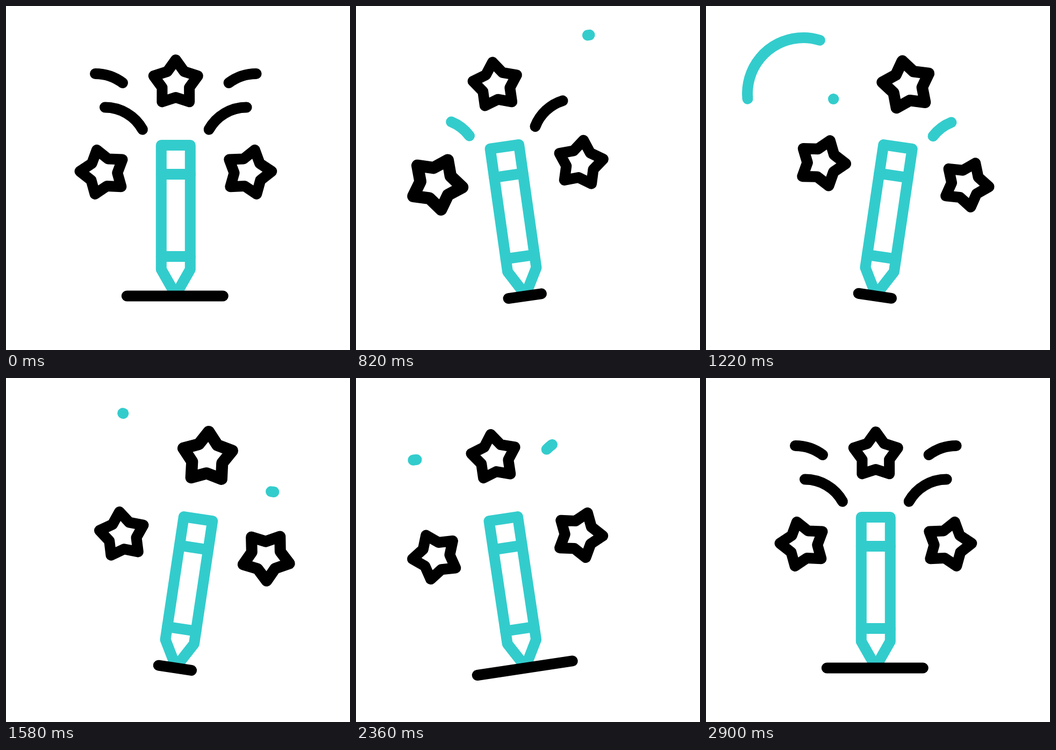
Write an HTML page with a canvas that moves like this. It is 640x640 px and loops after 3220 ms.

```html
<!DOCTYPE html>
<html lang="en">
<head>
<meta charset="utf-8">
<title>Magic pencil</title>
<style>
  html, body { margin: 0; height: 100%; overflow: hidden; background: #fff; }
  canvas { display: block; width: 100vmin; height: 100vmin; }
</style>
</head>
<body>
<canvas width="640" height="640"></canvas>
<script>
const ctx = document.querySelector('canvas').getContext('2d');
const LOOP = 3220, BLACK = '#000', TEAL = '#33cccc', RAD = Math.PI / 180;
const PIVOT = [315.8, 540];

const linear = u => u;
const sine = u => (1 - Math.cos(Math.PI * u)) / 2;
const lerp = (a, b, u) => a + (b - a) * u;

// Value at time t of a list of [time, value] keys, held at both ends.
function track(t, keys, ease = sine) {
  if (t <= keys[0][0]) return keys[0][1];
  for (let i = 1; i < keys.length; i++) {
    const [t0, v0] = keys[i - 1], [t1, v1] = keys[i];
    if (t < t1) return lerp(v0, v1, ease((t - t0) / (t1 - t0)));
  }
  return keys[keys.length - 1][1];
}
const ramp = (t, start, end) => track(t, [[start, 0], [end, 1]]);

const SWING = [[240, 0], [691, -10], [1338, 10], [1455, 10], [2180, -10], [2900, 0]];
const BAR = [[240, 89.5], [540, 31], [1900, 31], [2320, 89.5]];
const SPIN = [[0, 0], [260, 61], [570, 162], [980, 333], [1100, 360]];

const STARS = [
  { x: -135.2, y: -230.6, tilt: -15.6, start: 240 },
  { x: 0, y: -396.6, tilt: 0, start: 868 },
  { x: 135.4, y: -230.6, tilt: 15.6, start: 1320 }
];

const LOWER = { x: -131.8, y: -271.5, r: 80, from: -90, to: -29 };
const UPPER = { x: -149.8, y: -329, r: 85, from: -90, to: -53.1 };
const SPARKS = [
  { arc: LOWER, side: 1, hide: [320, 720], head: [680, 960], tail: [900, 1235] },
  { arc: LOWER, side: -1, hide: [720, 1120], head: [1080, 1360], tail: [1300, 1635] },
  { arc: UPPER, side: 1, hide: [500, 790], head: [1820, 2100], tail: [2100, 2435] },
  { arc: UPPER, side: -1, hide: [500, 790], head: [2268, 2548], tail: [2500, 2820] }
];

const TRAILS = [
  { arc: { x: 448, y: 156, r: 103, from: 41, to: -99.6 }, head: [240, 579], tail: [420, 855] },
  { arc: { x: 181, y: 163, r: 104, from: 173, to: 291 }, head: [840, 1270], tail: [1190, 1600] }
];

function stroke(color, points, closed) {
  ctx.strokeStyle = color;
  ctx.beginPath();
  points.forEach(([x, y]) => ctx.lineTo(x, y));
  if (closed) ctx.closePath();
  ctx.stroke();
}

// Strokes the part of an arc between the fractions a and b.
function strokeArc(color, { x, y, r, from, to }, a, b) {
  if (b - a < 0.002) return;
  const start = lerp(from, to, a) * RAD, end = lerp(from, to, b) * RAD;
  ctx.strokeStyle = color;
  ctx.beginPath();
  ctx.arc(x, y, r, start, end, end < start);
  ctx.stroke();
}

function drawSpark(t, { arc, side, hide, head, tail }) {
  ctx.save();
  ctx.scale(side, 1);
  strokeArc(BLACK, arc, ramp(t, ...hide) - ramp(t, 2560, 2890), 1);
  strokeArc(TEAL, arc, 1 - ramp(t, ...head), 1 - ramp(t, ...tail));
  ctx.restore();
}

function drawStar(t, { x, y, tilt, start }) {
  const spin = track(t - start, SPIN, linear);
  const scale = 1 + 0.14 * (1 - Math.abs(1 - spin / 180));
  const points = Array.from({ length: 10 }, (_, i) => {
    const r = i % 2 ? 26.6 : 43.2, a = (i * 36 - 90) * RAD;
    return [r * Math.cos(a), r * Math.sin(a)];
  });
  ctx.save();
  ctx.translate(x, y);
  ctx.rotate((tilt - spin) * RAD);
  ctx.scale(scale, scale);
  stroke(BLACK, points, true);
  ctx.restore();
}

function drawPencil() {
  stroke(TEAL, [[-27, -281], [27, -281], [27, -50], [0, -2.5], [-27, -50]], true);
  for (const y of [-227, -74]) stroke(TEAL, [[-27, y], [27, y]]);
}

function draw(t) {
  ctx.fillStyle = '#fff';
  ctx.fillRect(0, 0, 640, 640);
  ctx.lineWidth = 20;
  ctx.lineCap = ctx.lineJoin = 'round';

  for (const { arc, head, tail } of TRAILS)
    strokeArc(TEAL, arc, ramp(t, ...tail), ramp(t, ...head));

  ctx.save();
  ctx.translate(...PIVOT);
  ctx.rotate(track(t, SWING) * RAD);
  SPARKS.forEach(spark => drawSpark(t, spark));
  STARS.forEach(star => drawStar(t, star));
  drawPencil();
  const half = track(t, BAR);
  stroke(BLACK, [[-1.5 - half, -0.5], [half - 1.5, -0.5]]);
  ctx.restore();
}

function frame() {
  draw(performance.now() % LOOP);
  requestAnimationFrame(frame);
}
frame();
</script>
</body>
</html>
```
